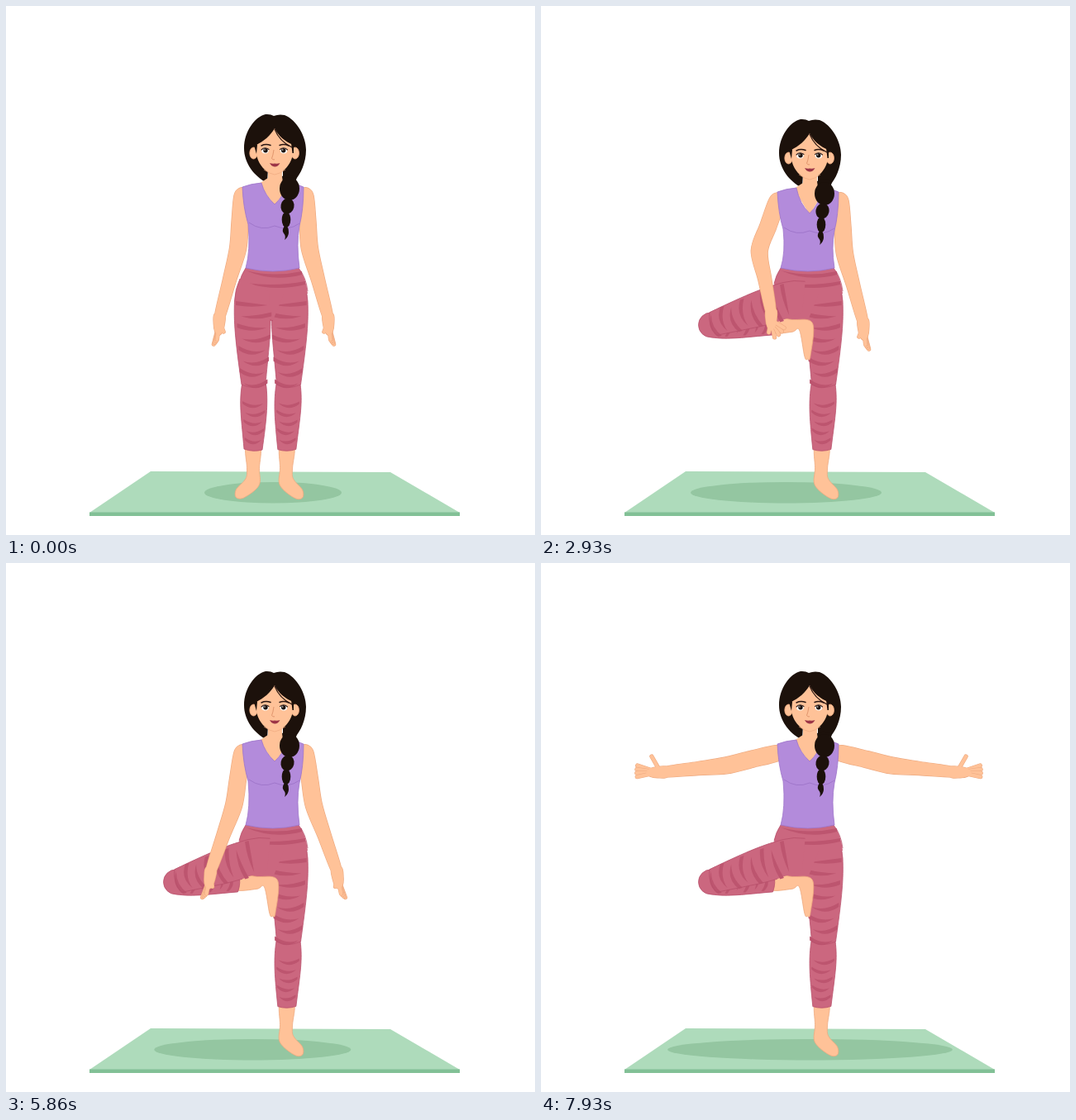
Write an HTML page that moves like this. It is 640x640 px and loops after 8 s.

```html
<!DOCTYPE html>
<html lang="en">
<head>
<meta charset="utf-8">
<title>Tree pose</title>
<style>
  html, body { margin: 0; width: 100%; height: 100%; overflow: hidden; background: #fff; }
  svg { display: block; width: 100vw; height: 100vh; }
  .skin { fill: #ffc298; }
  .skinline { fill: #ffc298; stroke: #eeaa80; stroke-width: .8; }
  .edge { fill: none; stroke: #eeaa80; stroke-width: 1.4; stroke-linejoin: round; }
  .pants { fill: #cb677f; }
  .pantsline { fill: none; stroke: #b9516c; stroke-width: .8; }
  .stripes { fill: #bd556f; }
  .hair { fill: #1c110b; }
  .ink { fill: none; stroke: #2a1712; stroke-linecap: round; }
</style>
</head>
<body>
<svg viewBox="0 0 640 640">
  <defs>
    <g id="thigh">
      <path class="pants" d="M-17 -27Q-23 -14 -23.500 0C-24.500 25 -23 45 -15 101Q0 108 14 101C17 65 20 45 20 22L18 -12Z"/>
      <path class="stripes" id="thighStripes"/>
      <path class="pantsline" d="M-17 -27Q-23 -14 -23.500 0C-24.500 25 -23 45 -15 101Q0 108 14 101C17 65 20 45 20 22"/>
    </g>
    <g id="shin">
      <path class="pants" d="M-15 0A15 15 0 0 1 15 0C17 22 15 40 10 76Q-1 79 -12 75C-15 40 -18 22 -15 0Z"/>
      <path class="stripes" id="shinStripes"/>
      <path class="pantsline" d="M-15 0A15 15 0 0 1 15 0C17 22 15 40 10 76Q-1 79 -12 75C-15 40 -18 22 -15 0Z"/>
    </g>
  </defs>

  <path fill="#aedbbb" d="M175 563L465 564L549 613H101Z"/>
  <path fill="#82c096" d="M101 612.500H549V617H101Z"/>
  <ellipse id="shadow" cy="588.700" ry="12.800" fill="#94c6a1"/>

  <g id="legR" transform="translate(641.500 0) scale(-1 1)">
    <path class="skinline"/><use href="#shin"/><use href="#thigh"/>
  </g>
  <path class="pants" d="M290 317Q284 326 282 336L290 362L296 379L323 380.500L336 348H365Q363 328 354 317Z"/>
  <path class="pantsline" d="M290 317Q284 326 282 336M354 317Q363 328 365 345M296 379L323 380.500"/>
  <path class="stripes" id="hipStripes"/>
  <g id="legL">
    <path class="skinline"/><use href="#shin"/><use href="#thigh"/>
  </g>

  <g id="armL"></g>
  <g id="armR" transform="translate(648 0) scale(-1 1)"></g>

  <g class="head">
    <path class="hair" d="M316 214C300 206 288 190 288 172C288 152 301 134 314 131Q320 130.500 324 133Q330 130.500 337 132C352 138 363 158 363 174C363 190 356 204 350 210L335 213V196H317Z"/>
  </g>
  <path id="neck" class="skin"/>
  <path id="shirt" fill="#b38bdb" stroke="#9d74c9" stroke-width=".8"/>
  <path id="chest" fill="none" stroke="#9d74c9" stroke-width=".9"/>

  <g class="head">
    <ellipse class="skinline" cx="299.500" cy="178" rx="4.700" ry="7"/>
    <ellipse class="skinline" cx="349.800" cy="178" rx="4.700" ry="7"/>
    <path class="skin" d="M303 168V178C304 192 316 203 325 204C334 203 346 192 347 178V168C338 164 329 157 325 148C320 157 311 164 303 168Z"/>
    <path class="edge" style="stroke-width:.7" d="M312 198Q319 203 325 204Q331 203 338 198"/>
    <path class="hair" d="M302 166L304 168L303 179L301 172ZM345 166L348 166L348 178L346.500 178Z"/>
    <path class="ink" stroke-width="1.200" d="M325 149Q331 164 346 171"/>
    <path class="ink" stroke-width="1.500" d="M309 169Q314 166.500 320 168.500M331 168.500Q336 166.500 342 169"/>
    <ellipse cx="313.500" cy="175" rx="4.300" ry="3.400" fill="#fff"/>
    <ellipse cx="336" cy="175" rx="4.300" ry="3.400" fill="#fff"/>
    <circle class="hair" cx="314" cy="174.800" r="2.700"/>
    <circle class="hair" cx="335.700" cy="174.800" r="2.700"/>
    <circle cx="313" cy="174" r=".7" fill="#fff"/>
    <circle cx="334.700" cy="174" r=".7" fill="#fff"/>
    <path class="ink" stroke-width="1.100" d="M309 174Q313 169.800 318 173.500M331.500 173.500Q336 169.800 340.500 174"/>
    <path fill="none" stroke="#dd9068" stroke-width=".9" d="M324 174Q323 181 321.500 184.500Q323 186.500 325 185.800"/>
    <path fill="#9c3547" d="M319 190Q322 191 325 190.600Q329 191 331.500 190Q329 194.500 325 194.500Q321 194 319 190Z"/>
    <g class="hair">
      <path d="M334 206Q343 201 352 207L350 214H335Z"/>
      <ellipse cx="343" cy="221" rx="12" ry="14"/>
      <ellipse cx="340.500" cy="242" rx="8" ry="9.500" transform="rotate(12 340.500 242)"/>
      <ellipse cx="339" cy="258.500" rx="5.300" ry="9.500"/>
      <path d="M337 266Q333 272 336 275Q339 278 337 283Q342 279 342 274Q342 269 340 266Z"/>
    </g>
  </g>
</svg>

<script>
const LOOP = 8000, FPS = 14;
const $ = q => document.querySelector(q);
const put = (el, attrs) => { for (const k in attrs) el.setAttribute(k, attrs[k]); };
const clamp = x => Math.max(0, Math.min(1, x));
const ease = (t, a, b) => { const x = clamp((t - a) / (b - a)); return x * x * (3 - 2 * x); };
const mix = (a, b, k) => a + (b - a) * k;
// Curve through a at 0, b at one half and c at 1
const via = (a, b, c, u) => a * (1 - u) * (1 - 2 * u) + 4 * b * u * (1 - u) + c * u * (2 * u - 1);
const fix = p => p.map(v => v.toFixed(2)).join(' ');

// Point at a distance from o; 0 degrees is down, positive swings left
function reach(o, deg, dist) {
  const r = deg * Math.PI / 180;
  return [o[0] - dist * Math.sin(r), o[1] + dist * Math.cos(r)];
}
const between = (p, q, k) => [mix(p[0], q[0], k), mix(p[1], q[1], k)];

// Smooth closed outline through the points
function blob(pts) {
  const n = pts.length, at = i => pts[(i + n) % n];
  let d = 'M' + fix(pts[0]);
  for (let i = 0; i < n; i++) {
    const [a, b, c, e] = [at(i - 1), at(i), at(i + 1), at(i + 2)];
    d += 'C' + fix([b[0] + (c[0] - a[0]) / 6, b[1] + (c[1] - a[1]) / 6,
                    c[0] - (e[0] - b[0]) / 6, c[1] - (e[1] - b[1]) / 6, ...c]);
  }
  return d + 'Z';
}

// Limb of varying radius r around a spine, with a rounded far end
function tube(spine, r) {
  const last = spine.length - 1, left = [], right = [];
  spine.forEach((p, i) => {
    const a = spine[Math.max(i - 1, 0)], b = spine[Math.min(i + 1, last)];
    const len = Math.hypot(b[0] - a[0], b[1] - a[1]);
    const ux = (b[0] - a[0]) / len * r[i], uy = (b[1] - a[1]) / len * r[i];
    left.push([p[0] + uy, p[1] - ux]);
    right.unshift([p[0] - uy, p[1] + ux]);
    if (i === last) left.push([p[0] + ux, p[1] + uy]);
  });
  return blob([...left, ...right]);
}

// Band that is h thick at its start, bulges by w and tapers to a point
function stripe(x1, y1, x2, y2, sag, h, w) {
  const mx = (x1 + x2) / 2, my = (y1 + y2) / 2 + sag;
  return `M${x1} ${y1}Q${mx} ${my} ${x2} ${y2}Q${mx} ${my + w} ${x1} ${y1 + h}Z`;
}

function drawStripes() {
  let thigh = '', shin = '', hip = '';
  for (let i = 0; i < 8; i++) {
    const side = i % 2 ? 1 : -1, half = 22 - i * .8, y = i * 13.5;
    thigh += stripe(side * half, y, -side * half * .75, y + 5, Math.min(i * 2, 8), 5, 6);
  }
  for (let i = 0; i < 5; i++) {
    const side = i % 2 ? 1 : -1, half = 14 - i * .7;
    shin += stripe(side * half, 17 + i * 11, -side * half * .8, 20 + i * 11, 6, 3, 6);
  }
  for (let i = 0; i < 2; i++)
    hip += stripe(358 + i * 4, 321 + i * 12, 290, 320 + i * 15, 8 - i * 2, 4, 6);
  put($('#thighStripes'), { d: thigh });
  put($('#shinStripes'), { d: shin });
  put($('#hipStripes'), { d: hip });
}

const HIP = [300, 357];

// side turns the foot from facing forward to hanging sideways
function drawLeg(leg, thighTurn, shinTurn, size, side) {
  const [foot, shin, thigh] = leg.children;
  const knee = reach(HIP, thighTurn, 104 * size);
  const place = `translate(${knee}) rotate(${shinTurn})`;
  const heel = [-2, 115];
  const toe = reach(heel, mix(47, 87, side), mix(20, 36, side));
  put(thigh, { transform: `translate(${HIP}) rotate(${thighTurn}) scale(1 ${size})` });
  put(shin, { transform: place });
  put(foot, { transform: place,
    d: tube([[-1, 72], [-1, 98], heel, toe], [8.5, 7.5, 9, mix(7, 3.5, side)]) });
}

const FINGERS = 4;

function buildArm(arm) {
  const line = (color, w) =>
    `<path class="finger" fill="none" stroke="${color}" stroke-width="${w}" stroke-linecap="round"/>`;
  arm.innerHTML = '<path class="edge limb"/>'
    + (line('#eeaa80', 5.2) + line('#ffc298', 4)).repeat(FINGERS + 1)
    + '<path class="skin limb"/>';
}

function drawArm(arm, dy, open, grip) {
  const a = 4.5 + 72 * open + 15 * grip;
  const b = 15 + 69 * open - 26 * grip;
  const c = 3 + 85 * open - 3 * grip;
  const shoulder = [285.5, 230 + dy];
  const elbow = reach(shoulder, a, 64);
  const wrist = reach(elbow, b, 86 - 11 * open * (2 - open) - 10 * grip);
  const limb = tube(
    [reach(shoulder, a, -9), shoulder, between(shoulder, elbow, .5), elbow, between(elbow, wrist, .45), wrist],
    [4, 9.5, 10, 10, 8, 6]);
  const palm = tube([-4, 8, 17].map(k => reach(wrist, c, k)), [6, 6.5, 4.500]);
  arm.querySelectorAll('.limb').forEach(p => put(p, { d: limb + palm }));

  const lines = arm.querySelectorAll('.finger');
  for (let i = 0; i <= FINGERS; i++) {
    const thumb = i === FINGERS;
    const fan = thumb ? -19 + 73 * open + 26 * grip
      : 9 + 7 * open - 17 * grip - i * (2 + 6 * open + 9 * grip);
    const len = thumb ? 18 + 6 * (open + grip) : 33 - 2 * i + 2 * open * i - 3 * grip;
    const d = 'M' + fix(reach(wrist, c + fan * .5, thumb ? 6 : 12)) + 'L' + fix(reach(wrist, c + fan, len));
    put(lines[2 * i], { d });
    put(lines[2 * i + 1], { d });
  }
}

function drawTorso(dy) {
  // The waist stays put while the chest sinks
  const y = v => (v + dy * clamp((317 - v) / 47)).toFixed(2);
  const vee = 240 + dy * 1.8;
  put($('#neck'), { d: `M317 ${y(196)}V${y(208)}L306 ${y(215)}L325 ${vee + 2}L344 ${y(215)}L334 ${y(207)}V${y(196)}Z` });
  put($('#shirt'), { d: `M286 ${y(219)}Q296 ${y(215)} 309 ${y(214)}Q313 ${vee - 11} 325 ${vee}`
    + `Q336 ${vee - 10} 341 ${y(214)}Q352 ${y(215)} 360 ${y(219)}Q360 ${y(246)} 355 ${y(266)}`
    + `Q351 ${y(288)} 355 317Q323 325 290 317Q296 ${y(296)} 293 ${y(264)}Q287 ${y(244)} 286 ${y(219)}Z` });
  put($('#chest'), { d: `M294 ${y(262)}Q309 ${y(273)} 325 ${y(266)}Q341 ${y(273)} 355 ${y(263)}` });
  document.querySelectorAll('.head').forEach(h => put(h, { transform: `translate(0 ${dy})` }));
}

function draw(ms) {
  const t = Math.floor(ms * FPS / 1000 + .01) * 1000 / FPS;
  const lift = ease(t, 1000, 2000);
  const back = ease(t, 3760, 4950);
  const grip = ease(t, 1000, 3050) - back;
  const open = ease(t, 5480, 7970);
  const dy = 5.3 * lift + .7 * ease(t, 2000, 2700) - 6 * back;

  const left = 240 - via(0, 35, 59, lift) - 28 * open;
  const right = 406 + 6 * lift + 86 * open;
  put($('#shadow'), { cx: (left + right) / 2, rx: (right - left) / 2 });

  drawLeg($('#legL'), via(0, 50, 73, lift), via(0, -37, -90, lift), 1 - .05 * lift, lift * lift);
  drawTorso(dy);
  drawArm($('#armL'), dy, open, grip);
  drawArm($('#armR'), dy, open, 0);
}

drawStripes();
buildArm($('#armL'));
buildArm($('#armR'));
drawLeg($('#legR'), 0, -2, 1, 0);

const start = performance.now();
function tick() {
  draw((performance.now() - start) % LOOP);
  requestAnimationFrame(tick);
}
tick();
</script>
</body>
</html>
```
